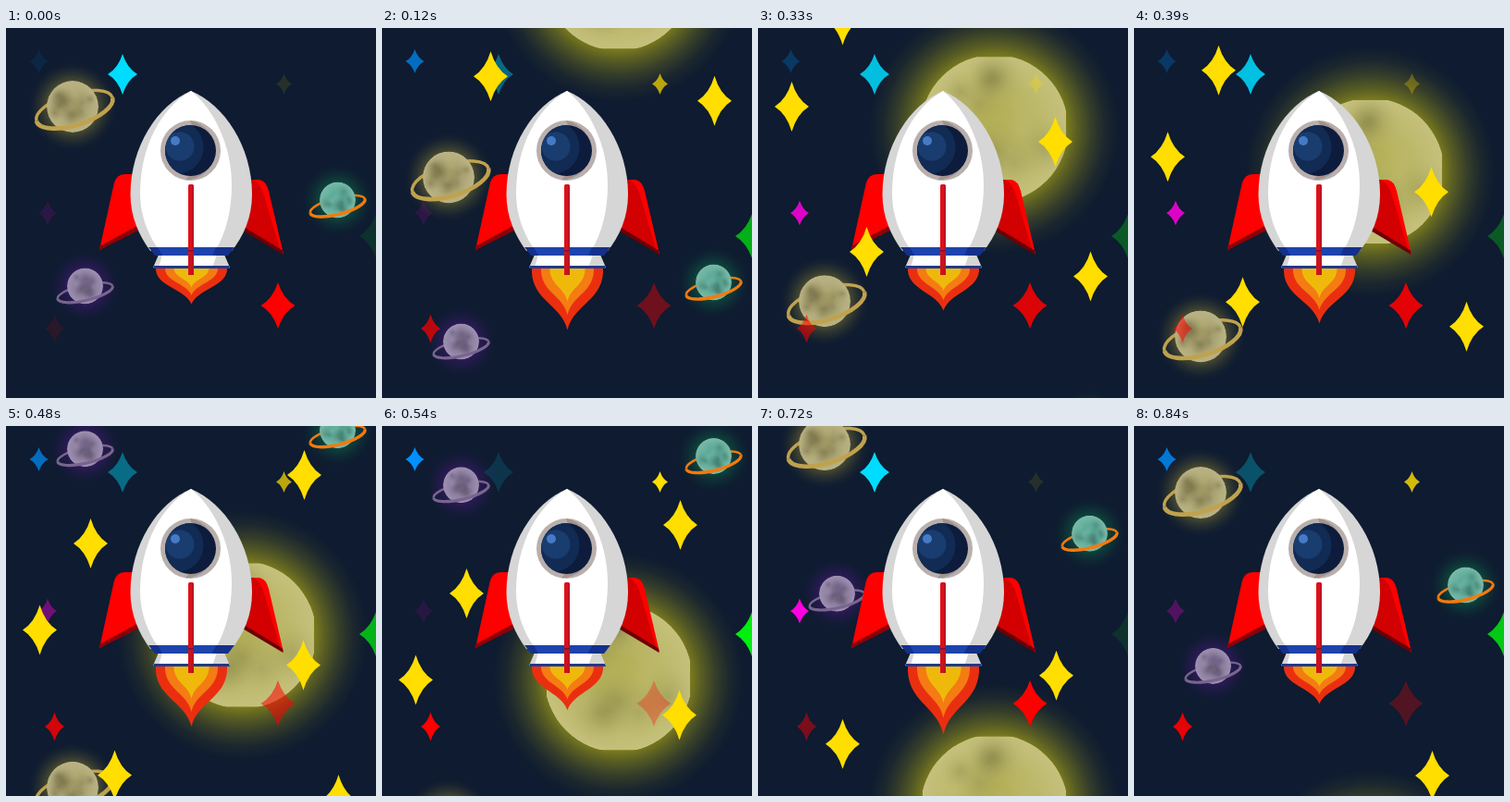
These frames come from a looping animation (400x400 px, 870 ms). An HTML page with a canvas:

```html
<!DOCTYPE html>
<html lang="en">
<head>
<meta charset="utf-8">
<title>Rocket flight</title>
<style>
html, body { margin: 0; width: 100%; height: 100%; overflow: hidden; background: #0e1b30; }
canvas { display: block; }
</style>
</head>
<body>
<canvas id="stage" width="400" height="400"></canvas>
<script>
const ctx = document.getElementById('stage').getContext('2d');
const LOOP = 870, STEP = 30;
const BEATS = [0, 180, 360, 540, 720, 870];
const FLAME_TIMES = [0, 150, 300, 450, 570, 720, 840, 870];
const FLAME_HEIGHTS = [40, 75, 40, 75, 40, 75, 42, 40];
const STAR_SPEED = 0.903;

// Falling stars: x and height at time zero
const falling = [[117.5, -56], [359.5, -29.5], [36.5, -213], [91.5, -306.5], [321.5, -175], [322.5, -380.5]];

// Twinkling stars: opacity at each beat
const twinkling = [
  { x: 35.5, y: 36, w: 10, h: 13, color: '#0090ff', alpha: [.1, 1, .1, 1, 0, 1] },
  { x: 126, y: 50, w: 16, h: 22, color: '#00dcff', alpha: [1, .1, 1, .13, 1, .1] },
  { x: 300.5, y: 60.5, w: 8.5, h: 11.5, color: '#ffde00', alpha: [.1, 1, .15, 1, .1, 1] },
  { x: 45, y: 200, w: 10, h: 13.5, color: '#ff00e0', alpha: [.12, .12, 1, .1, 1, .1] },
  { x: 52.5, y: 325, w: 10.5, h: 15.5, color: '#ff0000', alpha: [.12, 1, .45, 1, .45, 1] },
  { x: 294, y: 300, w: 18.5, h: 25, color: '#ff0000', alpha: [1, .1, 1, .3, 1, .1] },
  { x: 401, y: 225, w: 19, h: 27, color: '#00ef0e', alpha: [.1, 1, .15, 1, .1, 1] }
];

// Each planet leaves below, then returns from above to its starting height
const planets = [
  { x: 72, y: 85, r: 28, down: .637, back: .433, turn: 555, color: [166, 158, 100], glow: '165,150,50',
    ring: '#c0a24e', rx: 45, ry: 18, dx: 2, dy: 3, tilt: -.3, width: 4.6, seed: 3 },
  { x: 358.5, y: 186, r: 19.5, down: .742, back: .465, turn: 380, color: [84, 166, 146], glow: '15,125,75',
    ring: '#f47a0c', rx: 32.5, ry: 10, dx: 0, dy: 6.5, tilt: -.25, width: 3.4, seed: 8 },
  { x: 85.5, y: 279, r: 19.5, down: .5, back: .652, turn: 380, color: [130, 114, 152], glow: '85,25,140',
    ring: '#79658f', rx: 32.5, ry: 9.5, dx: 0, dy: 7, tilt: -.23, width: 3.2, seed: 5 }
];

function keyed(times, values, t) {
  let i = 1;
  while (i < times.length - 1 && t > times[i]) i++;
  const p = (t - times[i - 1]) / (times[i] - times[i - 1]);
  return values[i - 1] + (values[i] - values[i - 1]) * p;
}

function fillPath(d, color) {
  ctx.fillStyle = color;
  ctx.fill(new Path2D(d));
}

function disc(x, y, r, color) {
  ctx.fillStyle = color;
  ctx.beginPath();
  ctx.arc(x, y, r, 0, Math.PI * 2);
  ctx.fill();
}

function softDisc(x, y, inner, outer, rgb, alpha) {
  const g = ctx.createRadialGradient(x, y, inner, x, y, outer);
  for (let i = 0; i <= 4; i++) g.addColorStop(i / 4, `rgba(${rgb},${alpha * (1 - i / 4) ** 1.6})`);
  disc(x, y, outer, g);
}

function star(x, y, w, h, color, alpha = 1) {
  const k = .3;
  ctx.globalAlpha = alpha;
  ctx.fillStyle = color;
  ctx.beginPath();
  ctx.moveTo(x, y - h);
  ctx.quadraticCurveTo(x + w * k, y - h * k, x + w, y);
  ctx.quadraticCurveTo(x + w * k, y + h * k, x, y + h);
  ctx.quadraticCurveTo(x - w * k, y + h * k, x - w, y);
  ctx.quadraticCurveTo(x - w * k, y - h * k, x, y - h);
  ctx.fill();
  ctx.globalAlpha = 1;
}

// Cloudy sphere, paler towards its rim
function surface(x, y, r, color, seed, strength) {
  const random = () => (seed = (seed * 16807 + 11) % 2147483647) / 2147483647;
  for (let i = 0; i < 5; i++) random();
  const dark = color.map(c => Math.round(c * .6)).join();
  const light = color.map(c => Math.round(c + (255 - c) * .22)).join();
  const shade = ctx.createRadialGradient(x, y, r * .3, x, y, r);
  shade.addColorStop(0, `rgb(${color})`);
  shade.addColorStop(1, `rgb(${light})`);
  ctx.save();
  ctx.beginPath();
  ctx.arc(x, y, r, 0, Math.PI * 2);
  ctx.clip();
  disc(x, y, r, shade);
  for (let i = 0; i < 18; i++) {
    const a = random() * Math.PI * 2, d = Math.sqrt(random()) * r * .75;
    softDisc(x + Math.cos(a) * d, y + Math.sin(a) * d, 0, r * (.25 + random() * .3), i % 2 ? light : dark, strength);
  }
  softDisc(x, y + r * .3, 0, r * .45, dark, strength);
  ctx.restore();
}

function drawMoon(t) {
  const x = 255.5, y = -149 + .781 * t;
  softDisc(x, y, 74, 136, '180,174,20', .72);
  ctx.save();
  ctx.beginPath();
  ctx.rect(x - 77.5, y - 77.5, 155, 155);
  ctx.clip();
  surface(x, y, 80, [180, 176, 88], 14, .26);
  ctx.restore();
}

function drawRing(p, y, front) {
  ctx.strokeStyle = p.ring;
  ctx.lineWidth = front ? p.width : p.width * .75;
  ctx.beginPath();
  ctx.ellipse(p.x + p.dx, y + p.dy, p.rx - 2, p.ry - 1, p.tilt, front ? 0 : Math.PI, front ? Math.PI : Math.PI * 2);
  ctx.stroke();
}

function drawPlanet(p, t) {
  const y = t < p.turn ? p.y + p.down * t : p.y - p.back * (LOOP - t);
  softDisc(p.x, y, p.r * .85, p.r + 20, p.glow, .5);
  drawRing(p, y, false);
  surface(p.x, y, p.r, p.color, p.seed, .4);
  drawRing(p, y, true);
}

function drawFlame(height) {
  const layers = [[38.5, 1, '#ea2f10'], [28.5, .76, '#f47c12'], [19, .55, '#efb90c']];
  for (const [w, scale, color] of layers) {
    const h = height * scale, top = 258;
    ctx.fillStyle = color;
    ctx.beginPath();
    ctx.moveTo(200.5 - w, top);
    ctx.bezierCurveTo(200.5 - w * 1.06, top + h * .54, 200.5 - w * .18, top + h * .58, 200.5, top + h + .5);
    ctx.bezierCurveTo(200.5 + w * .18, top + h * .58, 200.5 + w * 1.06, top + h * .54, 200.5 + w, top);
    ctx.fill();
  }
}

function drawFins() {
  fillPath('M140 158H129Q120 158 117 167L101 240L145 215Z', '#ff0000');
  fillPath('M101 236L100.500 240.500L145 218V212Z', '#8c0007');
  fillPath('M258 164H274Q281 165 284 176L300 244.500L254 216Z', '#ff0000');
  fillPath('M258 164H268Q276 170 279 181L297 242L254 216Z', '#d20000');
  fillPath('M254 213L299 240.500L299.500 245L254 218Z', '#6c0007');
}

function drawBody() {
  const hull = 'M200 68C164 83 134.500 128 134.500 180C134.500 204 144 225 156 241H244C257 225 266 204 266 180C266 128 236 83 200 68Z';
  fillPath(hull, '#d6d6d6');
  fillPath('M200 68C168 86 145 128 145 178C145 205 155 226 166 241H226C238 222 244 196 244 170C244 126 224 87 200 68Z', '#ffffff');

  fillPath('M165 245H236L242 259H159Z', '#d6d6d6');
  fillPath('M169 245H228L223 259H165Z', '#ffffff');
  fillPath('M154 237H247L240 246H161Z', '#14308a');
  fillPath('M164 237H227L223 246H169Z', '#1d43ad');
  fillPath('M160 257H241L242 260H159Z', '#1b3a92');

  ctx.fillStyle = '#df1019';
  ctx.beginPath();
  ctx.roundRect(197, 169, 6, 72, 1.5);
  ctx.fill();
  ctx.fillStyle = '#bd1420';
  ctx.fillRect(201, 170, 2, 71);
  ctx.fillRect(197, 241, 6, 26);
  ctx.fillStyle = '#cf121b';
  ctx.fillRect(197, 242, 3.5, 25);
  ctx.fillStyle = '#7b1230';
  ctx.fillRect(197, 240, 6, 1.5);
}

function drawWindow() {
  const x = 199.5, y = 132.5;
  disc(x, y, 32.5, '#b9afac');
  fillPath('M199 100A32.500 32.500 0 0 1 194 164.500Q216 140 199 100Z', '#a0938f');
  ctx.save();
  ctx.beginPath();
  ctx.arc(x, y, 27.5, 0, Math.PI * 2);
  ctx.clip();
  disc(x, y, 28, '#0d1c3c');
  disc(185, 129, 28.5, '#112b55');
  disc(188, 128, 15.5, '#1a3d70');
  disc(183, 122, 5, '#467ac6');
  ctx.restore();
}

function render(t) {
  ctx.fillStyle = '#0e1b30';
  ctx.fillRect(0, 0, 400, 400);
  drawMoon(t);
  planets.forEach(p => drawPlanet(p, t));
  drawFlame(keyed(FLAME_TIMES, FLAME_HEIGHTS, t));
  drawFins();
  drawBody();
  drawWindow();
  twinkling.forEach(s => star(s.x, s.y, s.w, s.h, s.color, keyed(BEATS, s.alpha, t)));
  falling.forEach(([x, y]) => star(x, y + STAR_SPEED * t, 18.5, 27, '#ffde00'));
}

const start = performance.now();
function tick() {
  const t = (performance.now() - start) % LOOP;
  render(Math.floor(t / STEP) * STEP);
  requestAnimationFrame(tick);
}
tick();
</script>
</body>
</html>
```
